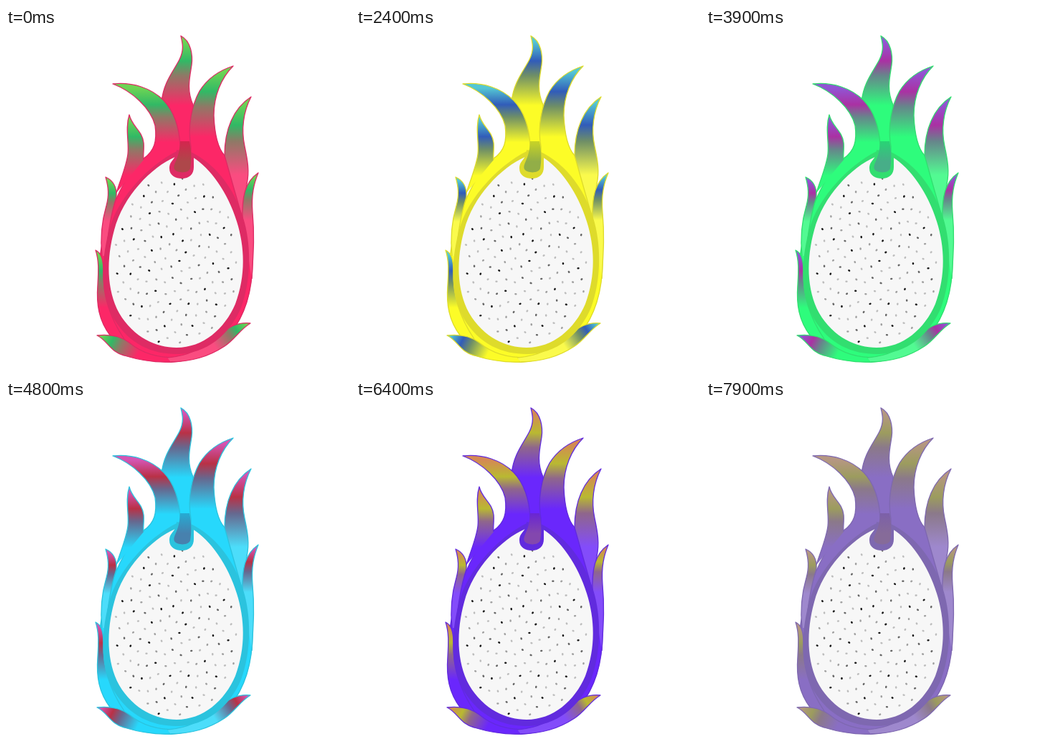
These frames come from a looping animation (480x480 px, 8 s). An HTML page:

```html
<!DOCTYPE html>
<html lang="en">
<head>
<meta charset="utf-8">
<title>Dragon fruit</title>
<style>
  html, body { margin: 0; width: 100%; height: 100%; overflow: hidden; background: #fff; }
  svg { display: block; width: 100%; height: 100%; }
  .skin, .leaf { stroke: var(--ring); stroke-width: 1.3; stroke-linejoin: round; }
  .skin { fill: var(--body); }
  .rind { fill: var(--ring); }
</style>
</head>
<body>
<svg viewBox="0 0 480 480">
  <defs id="defs">
    <linearGradient id="stem" x1="0" x2="0" y2=".65" y1="0">
      <stop style="stop-color:var(--stemTop)"/>
      <stop offset="1" style="stop-color:var(--stem)"/>
    </linearGradient>
  </defs>

  <path class="skin" d="M305 178C322 200 344 270 344 325C344 370 333 402 312 428C292 452 260 465 230 466C190 466 160 451 146 430C130 405 128 375 129 340C132 285 158 210 192 182"/>

  <!-- data-reach: length of the colour fade below the tip; data-lean: its sideways run -->
  <path class="leaf" data-reach="109" data-root="lite" d="M305 178C305 142 317 112 342 96C331 117 328 142 333 165C337 184 340 200 336 218C334 232 331 250 330 266Z"/>
  <path class="leaf" data-reach="85" data-root="body" d="M154 230C161 208 168 192 170 176C172 160 166 140 172 121C176 138 190 143 192 160C193 168 191 178 192 184"/>
  <path class="leaf" data-reach="62" data-root="lite" d="M134 318C131 290 135 265 140 248C144 233 143 222 139 208C150 213 155 222 154 236C147 258 141 290 140 318"/>
  <path class="leaf" data-reach="66" data-root="lite" d="M330 268C329 236 333 215 352 202C346 217 342 232 344 258C347 290 345 315 343 350"/>
  <path class="leaf" data-reach="80" data-root="body" d="M146 430C129 408 126 385 128 358C129 340 130 325 125 310C133 314 136 323 136 340C135 370 142 400 165 434"/>
  <path class="leaf" data-reach="28" data-lean="56" data-root="body" d="M230 466C210 467 188 464 165 457C145 452 142 436 127 429C145 427 160 430 172 439C190 454 210 460 240 460"/>
  <path class="leaf" data-reach="32" data-lean="-50" data-root="lite" d="M230 466C260 465 282 459 305 444C320 434 326 421 341 412C322 410 310 418 295 430C275 446 255 458 225 460"/>
  <path class="leaf" data-reach="97" data-root="body" d="M244 190L217 103C220 75 234 60 242 44C249 30 246 20 244 11C258 18 261 38 259 52C256 70 252 88 261 107L257 190"/>
  <path class="leaf" data-reach="82" data-root="body" d="M192 182C207 172 211 158 208 136C202 112 176 88 149 78C177 75 203 84 220 101C235 117 242 140 243 165V190"/>
  <path class="leaf" data-reach="99" data-root="body" d="M258 190V165C253 138 259 108 270 88C282 69 298 59 317 53C300 70 290 95 290 122C291 148 296 168 305 178"/>

  <path class="rind" d="M247 168C205 185 155 235 143 285C132 330 132 370 150 405C172 442 205 455 238 455C280 455 312 428 328 390C343 350 342 300 331 265C318 222 290 185 247 168"/>
  <path fill="#f7f7f7" d="M236 180C203 194 163 235 151 282C140 322 140 365 158 398C178 432 210 446 238 446C275 446 305 420 320 385C335 345 333 305 322 270C310 230 285 195 260 180Z"/>
  <g id="seeds"></g>
  <path class="rind" d="M238 170C238 184 228 184 228 196C228 206 237 210 245 210C256 210 262 204 262 194L262 176Z"/>
  <path fill="url(#stem)" d="M243 158L256 158C259 172 259 185 257 196C255 203 239 203 235 197C232 189 242 184 243 158Z"/>
</svg>
<script>
const add = (parent, tag, attrs) => {
  const el = document.createElementNS('http://www.w3.org/2000/svg', tag);
  for (const key in attrs) el.setAttribute(key, attrs[key]);
  return parent.appendChild(el);
};

function paintLeaf(leaf, i) {
  const { reach, lean = 0, root } = leaf.dataset;
  const box = leaf.getBBox();
  const x1 = lean < 0 ? box.x + box.width : box.x, y1 = box.y;
  const gradient = add(document.getElementById('defs'), 'linearGradient', {
    id: 'leaf' + i, gradientUnits: 'userSpaceOnUse', x1, y1, x2: x1 + +lean, y2: y1 + +reach
  });
  const stops = { tip: .08, green: .36, mid: .57, [root]: 1 };
  for (const name in stops)
    add(gradient, 'stop', { offset: stops[name], style: `stop-color:var(--${name})` });
  leaf.setAttribute('fill', `url(#leaf${i})`);
}
document.querySelectorAll('.leaf').forEach(paintLeaf);

// Seeds spread evenly along a golden-angle spiral, squeezed into the flesh
const seedCount = 155;
for (let i = 0; i < seedCount; i++) {
  const r = Math.sqrt((i + .5) / seedCount), a = i * 2.39996;
  const cx = 237 + 87 * r * Math.cos(a), cy = 325 + 119 * r * Math.sin(a);
  add(document.getElementById('seeds'), 'ellipse', {
    cx, cy, rx: 1.7, ry: 1.3,
    fill: ['#161616', '#bdbdbd', '#666', '#bdbdbd', '#a0a0a0'][i * 7 % 5],
    transform: `rotate(${i * 67 % 180} ${cx} ${cy})`
  });
}

// Hue, saturation, lightness
const palette = {
  body: [342, .97, .57], lite: [342, .95, .64], ring: [341, .73, .52],
  tip: [108, .6, .58], green: [143, .58, .46], mid: [28, .17, .48],
  stem: [358, .42, .48], stemTop: [346, .7, .49]
};
const shifts = [0, 29, 54, 78, 130, 170, 208, 244, 277, 318];

const rgb = (h, s, l) => [0, 8, 4].map(n => {
  const k = (n + h / 30) % 12;
  return 255 * (l - s * Math.min(l, 1 - l) * Math.max(-1, Math.min(k - 3, 9 - k, 1)));
});
const shifted = ([h, s, l], i) => rgb((h + shifts[i]) % 360, s, l);
const faded = ([h, s, l]) => rgb((h + 277) % 360, s * .43, l + .03);

let shown;
function draw(now) {
  const t = now % 8000, state = Math.floor(t / 800);
  const step = Math.max(0, Math.floor((t % 800 - 400) / 100));
  const key = state * 4 + step;
  if (key !== shown) {
    shown = key;
    const last = state === shifts.length - 1;
    const amount = step / (last ? 3 : 4);
    for (const name in palette) {
      const from = shifted(palette[name], state);
      const to = last ? faded(palette[name]) : shifted(palette[name], state + 1);
      const mix = from.map((v, i) => Math.round(v + (to[i] - v) * amount));
      document.documentElement.style.setProperty('--' + name, `rgb(${mix})`);
    }
  }
  requestAnimationFrame(draw);
}
draw(performance.now());
</script>
</body>
</html>
```
